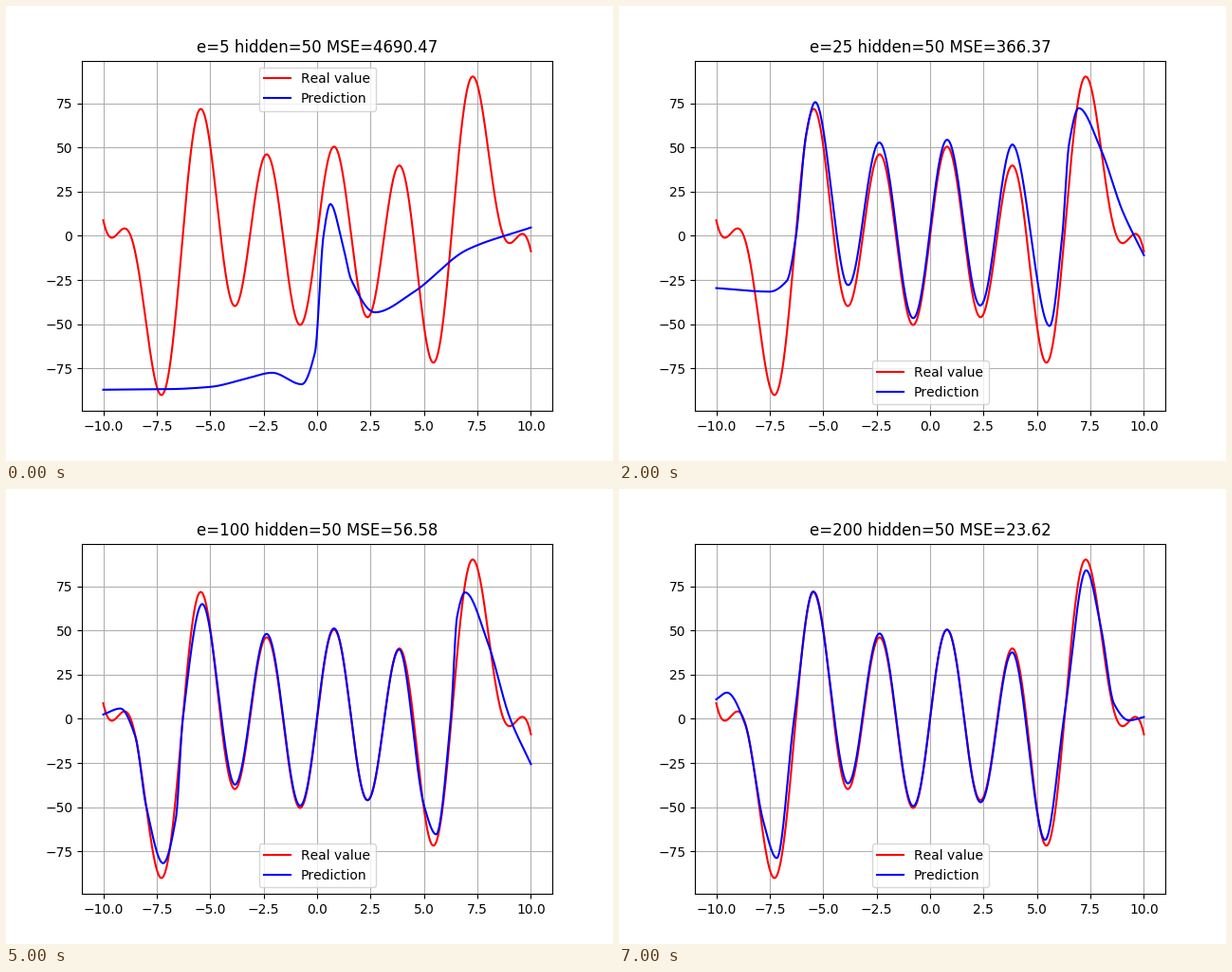
These frames come from a looping animation (640 by 480 pixels, 8000 ms). A matplotlib script:

```python
import numpy as np
import matplotlib.pyplot as plt
from matplotlib.animation import FuncAnimation

plt.rcParams["text.kerning_factor"] = 6

X = np.linspace(-10, 10, 1001)


def real(x):
    return x**2 * np.sin(x) + 50 * np.sin(2 * x)


REAL = real(X)
rise = np.sign(np.diff(REAL))
turns = X[1:-1][rise[1:] != rise[:-1]]
turns = turns[np.abs(turns) < 4]


def ease(keys):
    """Smooth path through the keys that is level at each turning point."""
    px, py = np.array(keys).T
    h = np.diff(px)
    s = np.diff(py) / h
    same = s[:-1] * s[1:] > 0
    flat = np.where(same, s[:-1] + s[1:], 1)
    inner = np.where(same, 2 * s[:-1] * s[1:] / flat, 0)
    m = np.concatenate(([s[0]], inner, [s[-1]]))
    k = np.clip(np.searchsorted(px, X) - 1, 0, len(h) - 1)
    t = (X - px[k]) / h[k]
    step = t * t * (3 - 2 * t)
    return (py[k] + (py[k + 1] - py[k]) * step
            + h[k] * t * (1 - t) * (m[k] * (1 - t) - m[k + 1] * t))


def fit(left, lift, right):
    """Real curve plus a polynomial lift in the middle, eased paths outside."""
    middle = list(zip(turns, real(turns) + np.polyval(lift, turns)))
    inside = np.abs(X) < turns[-1]
    return np.where(inside, REAL + np.polyval(lift, X),
                    ease(left + middle + right))


p5 = ease([(-10, -87.1), (-7, -86.8), (-5, -85.5), (-3.3, -80.8),
           (-2.1, -77.5), (-.72, -84), (-.1, -66), (.3, 0), (.62, 17.9),
           (1.2, -5), (1.6, -25), (2.7, -43.3), (4.5, -32), (7, -8),
           (10, 4.7)])

p25 = fit([(-10, -29.6), (-7.5, -31.6), (-6.7, -25.5), (-6.28, -1),
           (-5.8, 57), (-5.37, 75.6)],
          (.57, 0, 3.5),
          [(5.59, -51), (6.18, 0), (6.5, 52), (6.95, 72.2), (8, 48.5),
           (9, 14), (10, -11)])

p50 = fit([(-10, -3.6), (-9, -18), (-8, -66), (-6.8, -85.1),
           (-6.15, -69), (-5.8, 0), (-5.27, 46.1)],
          (1.35, -2.2),
          [(5.4, -61.5), (6.2, 0), (6.6, 62), (7.18, 82), (8, 48.5),
           (8.5, 19), (9.2, 2.8), (10, .4)])

p75 = fit([(-10, 10.5), (-9.3, 12.6), (-8.48, 0), (-8, -37),
           (-7.18, -77.4), (-6.36, 0), (-6, 52), (-5.45, 66.8)],
          (-.6, 3),
          [(5, -49), (5.62, -65), (6.27, 0), (6.55, 54), (7, 70.8),
           (8, 47.5), (9, 9), (10, -23.5)])

p100 = fit([(-10, 2.4), (-9.2, 5.8), (-8.5, -10), (-8, -49),
            (-7.2, -81.7), (-6.6, -56), (-6.28, 0), (-5.37, 64.9)],
           (-.4, 1),
           [(5, -49), (5.57, -65.4), (6.25, 0), (6.55, 58), (6.92, 71.5),
            (8, 42.5), (9, 1), (10, -25.7)])

p200 = fit([(-10, 11), (-9.5, 14.8), (-8.65, -3), (-7.8, -58),
            (-7.17, -78.8), (-6.36, 0), (-5.47, 72)],
           (-.7, .5),
           [(5.38, -68.5), (6.28, 2), (7.3, 84), (8, 51), (8.6, 8.5),
            (9.3, -.9), (10, 1)])

STEPS = [(5, "4690.47", p5),
         (10, "1498.35", .4 * p5 + .6 * p25),
         (25, "366.37", p25),
         (50, "347.57", p50),
         (75, "77.94", p75),
         (100, "56.58", p100),
         (150, "35.86", .5 * (p100 + p200)),
         (200, "23.62", p200)]

fig, ax = plt.subplots(figsize=(6.4, 4.8), dpi=100)


def draw(i):
    epoch, mse, pred = STEPS[i]
    ax.clear()
    ax.plot(X, REAL, "r", label="Real value")
    ax.plot(X, pred, "b", label="Prediction")
    ax.set_title(f"e={epoch} hidden=50 MSE={mse}")
    ax.grid(True)
    ax.legend(loc="lower center" if i else "upper center")


anim = FuncAnimation(fig, draw, frames=len(STEPS), init_func=lambda: None,
                     interval=1000, repeat=True, repeat_delay=0)
plt.show()
```
